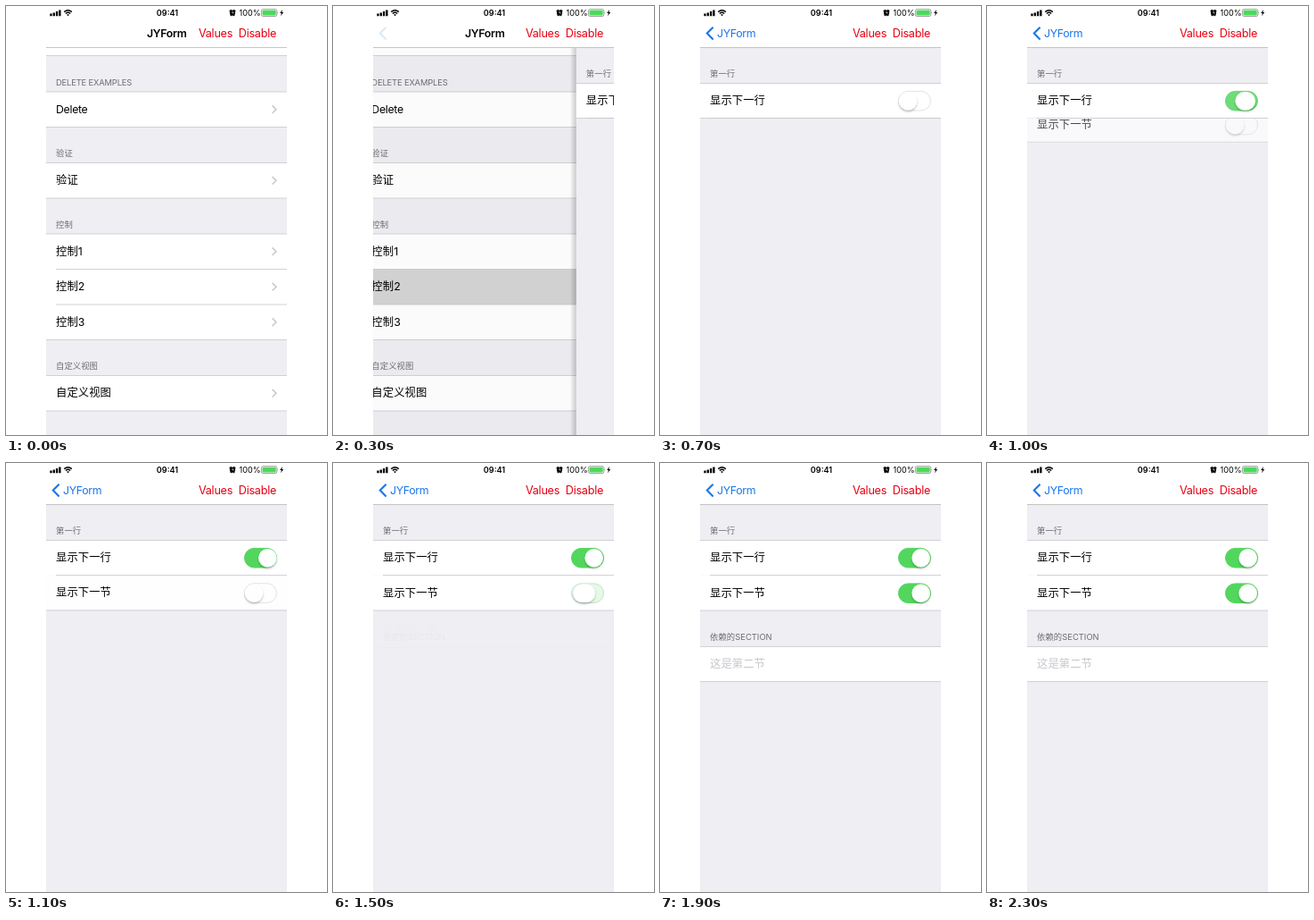
An HTML page for the animation above (2400 ms loop, 360 by 480 pixels).

```html
<!DOCTYPE html>
<html lang="zh-CN">
<head>
<meta charset="utf-8">
<style>
  html, body { margin: 0; width: 100%; height: 100%; overflow: hidden; background: #fff; }
  svg { display: block; width: 360px; height: 480px; }
  text { font: 12.3px Inter, "Noto Sans CJK SC", "Noto Sans CJK", sans-serif; letter-spacing: -.024em; white-space: pre; }
  .cjk { letter-spacing: .008em; }
  .head { font-size: 9.36px; letter-spacing: -.015em; fill: #6d6d72; }
  .head.cjk { letter-spacing: .005em; }
  .title { font-weight: 600; }
  .blue { fill: #1a75ec; }
  .red { fill: #e60012; font-size: 12.7px; }
  .status { font-size: 9.1px; letter-spacing: 0; }
  .hint { fill: #c7c7cd; }
</style>
</head>
<body>
<svg viewBox="0 0 360 480">
  <defs>
    <clipPath id="screen"><rect x="45" y="0" width="270" height="480"/></clipPath>
    <linearGradient id="edge"><stop offset="0" stop-opacity="0"/><stop offset="1" stop-opacity=".2"/></linearGradient>
    <filter id="drop" x="-40%" y="-40%" width="180%" height="200%">
      <feDropShadow dx="0" dy="1.6" stdDeviation="1.1" flood-opacity=".28"/>
    </filter>
  </defs>
  <rect width="360" height="480" fill="#fff"/>
  <g clip-path="url(#screen)">
    <g id="list"></g>
    <rect id="dim" x="45" y="46" width="270" height="434"/>
    <g id="detail"></g>
    <rect x="45" y="0" width="270" height="46.5" fill="#fff"/>
    <path d="M45 46.5H315" stroke="#b8b8b8" stroke-width=".8"/>
    <path id="back" d="M59.6 23.8L52.8 30.6L59.6 37.4" fill="none" stroke="#1a75ec" stroke-width="2.1"/>
    <text id="title" class="title" y="35">JYForm</text>
    <text id="backLabel" class="blue" y="35">JYForm</text>
    <text class="red" x="216" y="35.2">Values</text>
    <text class="red" x="303" y="35.2" text-anchor="end">Disable</text>
    <g id="statusBar">
      <path d="M49.3 8.6h2.3v2.6h-2.3zM52.6 7.4h2.3v3.8h-2.3zM55.9 6h2.3v5.2h-2.3zM59.2 4.4h2.3v6.8h-2.3z"/>
      <g fill="none" stroke="#000" stroke-width="1.4">
        <path d="M65.2 6.6Q69.5 2.9 73.8 6.6M66.8 8.5Q69.5 6.2 72.2 8.5"/>
      </g>
      <path d="M69.5 11.3L67.9 9.7Q69.5 8.6 71.1 9.7Z"/>
      <text class="status title" x="181" y="10.9" text-anchor="middle">09:41</text>
      <circle cx="254" cy="7.7" r="3.1"/>
      <path d="M250.6 6.1L252.6 4.3M257.4 6.1L255.4 4.3M251.8 11.2L252.6 10.1M256.2 11.2L255.4 10.1" stroke="#000" stroke-width="1.2"/>
      <path d="M254 5.8V7.9H255.6" fill="none" stroke="#fff" stroke-width=".7"/>
      <text class="status" x="261.5" y="10.9">100%</text>
      <rect x="286.4" y="3.7" width="17.4" height="7.8" rx="1.8" fill="none" stroke="#777" stroke-width=".7"/>
      <rect x="287.5" y="4.8" width="15.2" height="5.6" rx="1" fill="#4cd95b"/>
      <path d="M304.6 6.3q1.2 1.3 0 2.6z" fill="#777"/>
      <path d="M310.1 4L307.2 8.1H308.9L308.1 11.3L311.2 7H309.4Z"/>
    </g>
  </g>
</svg>
<script>
const LOOP = 2400, STEP = 100, WIDTH = 270, ROW = 39.5;
const $ = id => document.getElementById(id);
const clamp = v => Math.min(1, Math.max(0, v));
const smooth = v => (v = clamp(v)) * v * (3 - 2 * v);
const set = (el, attrs) => { for (const k in attrs) el.setAttribute(k, attrs[k]); };
const move = (el, x, y) => set(el, { transform: `translate(${x} ${y})` });

const rect = (y, h, fill) => `<rect x="45" y="${y}" width="${WIDTH}" height="${h}" fill="${fill}"/>`;
const line = (y, x = 45) => `<path d="M${x} ${y}H315" stroke="#c8c7cc" stroke-width=".8"/>`;
const label = (text, y, cls = '') =>
  `<text x="56" y="${y}" class="${cls} ${/[^\x00-\x7f]/.test(text) ? 'cjk' : ''}">${text}</text>`;
const header = (text, bottom) => label(text, bottom - 7.4, 'head');
const chevron = y => `<path d="M298.6 ${y - 4.3}L303 ${y}L298.6 ${y + 4.3}" fill="none" stroke="#c7c7cc" stroke-width="1.5"/>`;
const toggle = (id, y) => `<g id="${id}">
  <rect class="track" x="267.5" y="${y - 10.6}" width="36" height="21.6" rx="10.8"/>
  <rect class="knob" y="${y - 10.1}" height="20.6" rx="10.3" fill="#fff" filter="url(#drop)"/></g>`;

function buildList() {
  const sections = [
    [96, 'DELETE EXAMPLES', ['Delete']], [175.5, '验证', ['验证']],
    [255, '控制', ['控制1', '控制2', '控制3']], [413.5, '自定义视图', ['自定义视图']]
  ];
  let out = rect(46, 434, '#eeeef3') + rect(46, 9.5, '#fff') + line(55.5);
  for (const [top, name, rows] of sections) {
    const bottom = top + rows.length * ROW;
    out += header(name, top) + rect(top, bottom - top, '#fff');
    rows.forEach((text, i) => {
      const y = top + i * ROW;
      if (text === '控制2') out += `<g id="pressed">${rect(y, ROW, '#d4d4d4')}</g>`;
      out += (i ? line(y, 56) : '') + label(text, y + 23.9) + chevron(y + 19.7);
    });
    out += line(top) + line(bottom);
  }
  $('list').innerHTML = out;
}

function buildDetail() {
  $('detail').innerHTML = `
    <rect id="shadow" x="38" y="46" width="7" height="434" fill="url(#edge)"/>
    ${rect(46, 434, '#eeeef3')}${header('第一行', 86.5)}
    <g id="secondRow">${rect(125.5, ROW, '#fff')}${label('显示下一节', 149.6)}${toggle('switchB', 145.5)}${line(165)}</g>
    ${rect(86.5, 39, '#fff')}${line(86.5)}
    <g id="fullLine">${line(125.5)}</g>${line(125.5, 56)}
    ${label('显示下一行', 110.2)}${toggle('switchA', 106)}
    <g id="section">
      <g id="sectionRow">${rect(205.5, 39, '#fff')}${line(205.5)}${line(244.5)}${label('这是第二节', 229, 'hint')}</g>
      ${header('依赖的SECTION', 205.5)}
    </g>`;
}

const mix = (a, b, p) => `rgb(${a.map((v, i) => Math.round(v + (b[i] - v) * p))})`;

function drawSwitch(id, t, start) {
  const e = (t - start) / 100;
  const pos = e < 0 ? 0 : smooth((e + .5) / 2);
  const stretch = e < 0 ? 0 : 4 * clamp(1 - e / 2);
  const overshoot = e >= 2 && e < 3 ? .7 : 0;
  const green = [83, 214, 94];
  set($(id).querySelector('.track'), {
    fill: mix([255, 255, 255], green, pos), stroke: mix([226, 226, 229], green, pos)
  });
  set($(id).querySelector('.knob'), {
    x: 267.7 + pos * (14.7 - stretch) + overshoot, width: 20.6 + stretch
  });
}

function draw(t) {
  const push = t < 300 ? 0 : 1 - Math.exp(-1.5 * ((t - 270) / 100) ** 1.81);
  move($('list'), -81 * push, 0);
  set($('dim'), { opacity: .1 * push });
  set($('pressed'), { opacity: t < 300 ? 0 : 1 });
  move($('detail'), WIDTH * (1 - push), 0);
  set($('shadow'), { opacity: t < 300 ? 0 : clamp(4 * (1 - push)) });
  set($('title'), { x: 158 - 64 * push, opacity: clamp(1 - 1.25 * push * push) });
  set($('backLabel'), { x: 64 + 94 * (1 - push), opacity: clamp((push - .2) / .6) });
  set($('back'), { opacity: push });

  drawSwitch('switchA', t, 900);
  drawSwitch('switchB', t, 1500);

  const row = t < 900 ? 0 : smooth((t - 820) / 290);
  set($('secondRow'), { opacity: row });
  move($('secondRow'), 0, -ROW * (1 - row));
  set($('fullLine'), { opacity: 1 - row });

  const section = t < 1500 ? 0 : smooth((t - 1460) / 300);
  set($('section'), { opacity: section });
  move($('sectionRow'), 0, -40 * (1 - section));
}

buildList();
buildDetail();
const began = performance.now();
function tick() {
  const t = (performance.now() - began) % LOOP;
  draw(Math.floor(t / STEP) * STEP);
  requestAnimationFrame(tick);
}
tick();
</script>
</body>
</html>
```
